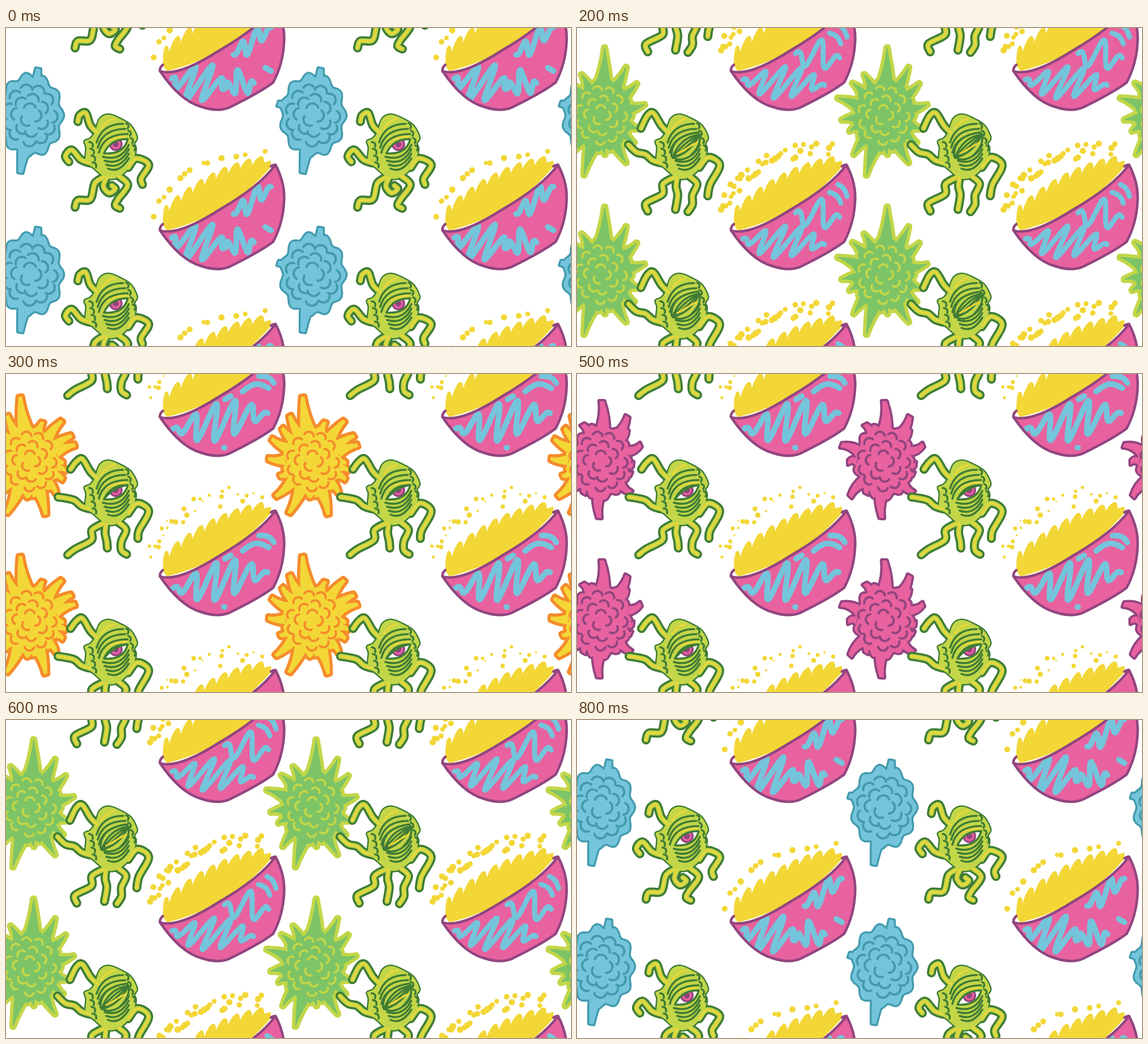
Animation, 998 px wide and 561 px high, one loop 0.9 s. Source, as an HTML page with a canvas:

```html
<!DOCTYPE html>
<html lang="en">
<head>
<meta charset="utf-8">
<title>Snack monsters</title>
<style>
html, body { margin: 0; width: 100%; height: 100%; overflow: hidden; background: #fff; }
canvas { display: block; width: 100vw; height: 100vh; }
</style>
</head>
<body>
<canvas id="stage" width="998" height="561"></canvas>
<script>
const ctx = document.getElementById('stage').getContext('2d');
const TILE_W = 499, TILE_H = 281, STEP = 100;
const YELLOW = '#f3d737', PINK = '#e8629f', PURPLE = '#91457f', BLUE = '#74c5db',
      LIME = '#c3d648', LEAF = '#3f7c35';

const { sin, cos, PI } = Math;
const range = n => Array.from({ length: n }, (_, i) => i);
const mix = (a, b, t) => a + (b - a) * t;
const points = text => text.trim().split(/\s+/).map(p => p.split(',').map(Number));
const quad = (a, b, c, t) => [0, 1].map(k => mix(mix(a[k], b[k], t), mix(b[k], c[k], t), t));

function seeded(seed) {
  return () => {
    seed = (seed * 16807) % 2147483647;
    return seed / 2147483647;
  };
}

// Smooth curve through points.
function curve(p, closed = false) {
  const n = p.length, path = new Path2D();
  const at = i => closed ? p[(i + n) % n] : p[Math.max(0, Math.min(n - 1, i))];
  path.moveTo(...p[0]);
  for (let i = 0; i < (closed ? n : n - 1); i++) {
    const [a, b, c, d] = [at(i - 1), at(i), at(i + 1), at(i + 2)];
    path.bezierCurveTo(b[0] + (c[0] - a[0]) / 6, b[1] + (c[1] - a[1]) / 6,
                       c[0] - (d[0] - b[0]) / 6, c[1] - (d[1] - b[1]) / 6, c[0], c[1]);
  }
  if (closed) path.closePath();
  return path;
}

function disc(x, y, r) {
  const path = new Path2D();
  path.arc(x, y, r, 0, 2 * PI);
  return path;
}

function fill(color, ...paths) {
  ctx.fillStyle = color;
  paths.forEach(p => ctx.fill(p));
}
function line(color, width, ...paths) {
  ctx.strokeStyle = color;
  ctx.lineWidth = width;
  paths.forEach(p => ctx.stroke(p));
}

// ---- Bowl
const bowl = new Path2D(`M272 357Q303 368 378 320Q450 278 476 241Q494 275 491 308Q489 345 472 377
  Q450 394 395 421Q375 430 345 420Q308 410 272 357Z`);
const rimEnds = new Path2D('M272 357Q271 351 277 346M468 244Q476 238 478 246');

function makePile(teeth) {
  const path = new Path2D('M284 357L277 347');
  for (let i = 0; i <= teeth; i++) {
    const [x, y] = quad([284, 312], [366, 241], [452, 226], i / teeth);
    path.quadraticCurveTo(x - 7, y - 1, x, y);
    path.quadraticCurveTo(x + 4, y + 1, x + 4, y + 11);
  }
  path.lineTo(468, 234);
  path.lineTo(468, 245);
  path.quadraticCurveTo(394, 331, 284, 357);
  return path;
}
const pile = makePile(8);

// A wave from one end to the other, swelling in the middle; no turns gives a plain arc.
function squiggle([x0, y0, x1, y1, swingX, swingY, turns]) {
  return curve(range(turns * 8 + 9).map((_, i, all) => {
    const t = i / (all.length - 1), swing = sin(PI * t) * cos(PI * turns * t);
    return [mix(x0, x1, t) + swingX * swing, mix(y0, y1, t) + swingY * swing];
  }));
}

// Crumbs hover over the pile, up to a given distance away.
function crumbs(count, spread, small, large, seed) {
  const random = seeded(seed);
  return range(count).map(i => {
    const [x, y] = quad([262, 335], [300, 228], [462, 222], (i + random()) / count);
    const away = spread * random();
    return disc(x - away * .4, y - away * .8, mix(small, large, random()));
  });
}

const makeLook = (width, waves, flying) => ({ width, flying, marks: waves.map(squiggle) });
const looks = {
  near: makeLook(10, [
    [293, 370, 388, 387, 18, -34, 7], [388, 380, 438, 378, -4, -24, 4],
    [402, 328, 468, 280, -3, 21, 5], [458, 351, 468, 357, 0, 0, 0]
  ], crumbs(13, 8, 3.5, 6, 71)),
  rising: makeLook(9, [
    [295, 376, 357, 382, 2, -20, 4], [372, 352, 392, 322, -16, 2, 4],
    [368, 386, 446, 374, 0, -24, 5], [405, 320, 450, 330, 4, -24, 4], [463, 270, 462, 366, -11, 0, 7]
  ], crumbs(12, 5, 3, 8, 23)),
  clumps: makeLook(9, [
    [293, 372, 437, 382, 18, -28, 10], [386, 326, 464, 334, 7, -28, 4],
    [446, 290, 466, 309, 3, -3, 0], [461, 276, 477, 297, 2, -3, 0]
  ], crumbs(38, 28, 4, 6, 5)),
  scatter: makeLook(10, [
    [295, 378, 462, 350, 10, -35, 10], [387, 326, 397, 320, 0, 0, 0],
    [418, 312, 464, 306, 0, -10, 0], [447, 285, 473, 297, 3, -4, 0], [385, 411, 386, 411, 0, 0, 0]
  ], crumbs(28, 34, 1.5, 5, 11))
};

function drawBowl({ width, marks, flying }) {
  fill(YELLOW, ...flying, pile);
  fill(PINK, bowl);
  ctx.save();
  ctx.clip(bowl);
  line(BLUE, width, ...marks);
  ctx.restore();
  line(PURPLE, 4.5, bowl, rimEnds);
}

// ---- Tentacled creature
const body = curve(points(`157,184 166,160 182,153 205,162 221,173 231,193 226,204 229,214
  222,240 200,262 178,265 154,246 141,236 142,211 139,200 149,195`), true);
const lids = range(3).map(i => new Path2D(
  `M${164 - 2 * i} ${220 - 9 * i}Q${172 - i} ${187 - 9 * i} ${215 - 4 * i} ${187 - 9 * i}`));
const bags = range(4).map(i => new Path2D(
  `M${171 + 3 * i} ${227 + 7 * i}Q${203 - i} ${236 + 7 * i} ${217} ${206 + 8 * i}`));
const warts = range(4).flatMap(i => [
  new Path2D(`M${147 + 2 * i} ${201 + 12 * i}q8 1 6 9`),
  new Path2D(`M${212 + 4 * i} ${168 + 13 * i}q7 3 3 9`)
]);
const glow = [new Path2D('M166 213Q176 193 212 191'), new Path2D('M168 178Q177 163 192 160')];
const eye = new Path2D('M173 221Q185 195 215 196Q208 224 173 221Z');
const heavyLid = new Path2D('M173 221Q185 195 215 196Q190 200 173 221Z');
const closedLid = new Path2D('M167 226Q166 190 214 184Q224 203 200 226Q180 238 167 226Z');
const lidLines = range(4).map(i => new Path2D(`M169 229Q${181 + 7 * i} ${193 + 9 * i} 216 188`));
const slit = new Path2D('M177 222Q194 212 212 202');

const limbs = text => text.split('/').map(points);
const lowered = limbs(`163,186 149,172 135,150 124,155 / 148,238 133,233 121,223 105,219
  / 216,246 232,228 252,242 235,276 / 173,263 152,275 151,293 122,309
  / 177,263 175,280 178,295 / 199,262 212,275 204,295 204,311`);
const withTips = text => points(text).map((tip, i) => curve([...lowered[i], tip]));
const poses = {
  curled: limbs(`163,186 149,172 141,150 130,154 127,165 / 148,238 132,232 116,215 105,226 111,236
    / 216,246 230,230 252,241 239,265 241,276 / 173,263 157,274 149,302 127,304 122,316
    / 178,263 172,279 182,291 193,284 187,278 / 199,261 215,277 198,302 193,313 201,318`)
    .map(limb => curve(limb)),
  reaching: withTips('114,168 92,217 233,290 109,319 179,307 213,318'),
  asleep: withTips('113,177 91,206 231,296 125,323 174,320 196,324')
};

function drawCreature(pose) {
  const arms = poses[pose];
  line(LEAF, 16, ...arms);
  line(LEAF, 5, body);
  line(LIME, 8.5, ...arms);
  fill(LIME, body);
  line(YELLOW, 2.5, ...arms, ...glow);
  line(LEAF, 3.5, ...lids, ...bags, ...warts);
  if (pose === 'asleep') {
    fill(LIME, closedLid);
    line(LEAF, 3.5, closedLid, ...lidLines);
    line(YELLOW, 3, slit);
    return;
  }
  fill('#fff', eye);
  ctx.save();
  ctx.clip(eye);
  fill(PURPLE, disc(194, 205, 12));
  line(PINK, 3.5, disc(194, 205, 7));
  ctx.restore();
  if (pose === 'reaching') {
    fill(LIME, heavyLid);
    line(LEAF, 3, heavyLid);
  }
  line(LEAF, 3.5, eye);
}

// ---- Shape-shifting fuzz: a bumpy ball with spikes reaching out to the given tips
const CX = 542, CY = 154;

function ball(rx, ry, bumps) {
  return curve(range(bumps * 6).map(i => {
    const a = i * PI / bumps / 3, swell = .94 + .06 * cos(a * bumps);
    return [CX + rx * swell * cos(a), CY + ry * swell * sin(a)];
  }), true);
}

function spike([x, y], blunt, bend) {
  const dist = Math.hypot(x - CX, y - CY), ux = (x - CX) / dist, uy = (y - CY) / dist;
  const root = 48, end = dist - 4 - blunt, half = 5 + (end - root) * .14, mid = mix(root, end, .5);
  const at = (along, across) => `${CX + ux * along - uy * across} ${CY + uy * along + ux * across}`;
  return new Path2D(`M${at(root, half)}Q${at(mid, half * .4 + blunt * .5 + bend)} ${at(end, blunt)}
    L${at(end, -blunt)}Q${at(mid, -half * .4 - blunt * .5 + bend)} ${at(root, -half)}Z`);
}

// Rings of little arcs that bulge outwards.
function curls(size, seed) {
  const random = seeded(seed), path = new Path2D();
  for (const ring of range(3)) {
    const count = 3 + ring * 4;
    for (const i of range(count)) {
      const a = (i + ring * .4 + random() * .3) * 2 * PI / count, r = 10 + ring * 17;
      const x = CX + r * cos(a) * .85, y = CY + r * sin(a), start = a - 1.3 + random() * .5;
      path.moveTo(x + size * cos(start), y + size * sin(start));
      path.arc(x, y, size, start, start + 2.5);
    }
  }
  return path;
}

const makeFuzz = (color, edge, width, shape, blunt, bend, tips, size) => ({
  color, edge, width, curls: curls(size, 97),
  parts: [shape, ...points(tips).map(tip => spike(tip, blunt, bend))]
});
const fuzz = {
  blue: makeFuzz(BLUE, '#439bae', 3.5, ball(58, 74, 11), 4, 2,
    '557,64 523,263 473,131', 11),
  green: makeFuzz('#7dc466', LIME, 6, ball(55, 65, 15), .5, 3,
    `548,30 588,65 608,95 623,134 613,179 604,205 588,242 549,228 510,264 486,227 477,184 463,163
     456,122 483,94 505,78`, 8),
  yellow: makeFuzz(YELLOW, '#f58c2b', 5.5, ball(53, 66, 15), 3, -4,
    `523,33 566,78 602,77 621,105 628,123 608,158 611,172 606,190 592,215 571,255 549,224 497,252
     471,221 477,183 456,149 463,111 483,90 498,67`, 9),
  pink: makeFuzz(PINK, PURPLE, 4, ball(53, 68, 13), 4, 7,
    `543,40 592,68 592,91 619,122 606,160 602,180 599,215 538,262 507,218 477,222 471,156 459,123
     505,82`, 9)
};

function drawFuzz({ color, edge, width, parts, curls }) {
  line(edge, width * 2, ...parts);
  fill(color, ...parts);
  line(edge, 4, curls);
}

// ---- Timeline: fuzz and creature cycle every four steps, the bowl goes out and back
const fuzzCycle = ['blue', 'pink', 'green', 'yellow'];
const poseCycle = ['curled', 'reaching', 'asleep', 'reaching'];
const outward = ['near', 'rising', 'clumps', 'scatter'];
const bowlCycle = [...outward, 'scatter', ...outward.slice().reverse()];

function eachTile(paint) {
  for (const row of [-1, 0, 1]) {
    for (const col of [-1, 0, 1]) {
      ctx.setTransform(1, 0, 0, 1, col * TILE_W, row * TILE_H);
      paint();
    }
  }
}

function draw(step) {
  ctx.setTransform(1, 0, 0, 1, 0, 0);
  ctx.lineCap = ctx.lineJoin = 'round';
  fill('#fff', new Path2D('M0 0H998V561H0Z'));
  eachTile(() => {
    drawBowl(looks[bowlCycle[step]]);
    drawFuzz(fuzz[fuzzCycle[step % 4]]);
  });
  eachTile(() => drawCreature(poseCycle[step % 4]));
}

let shown = -1;
function tick() {
  const step = Math.floor(performance.now() / STEP) % bowlCycle.length;
  if (step !== shown) draw(shown = step);
  requestAnimationFrame(tick);
}
tick();
</script>
</body>
</html>
```
